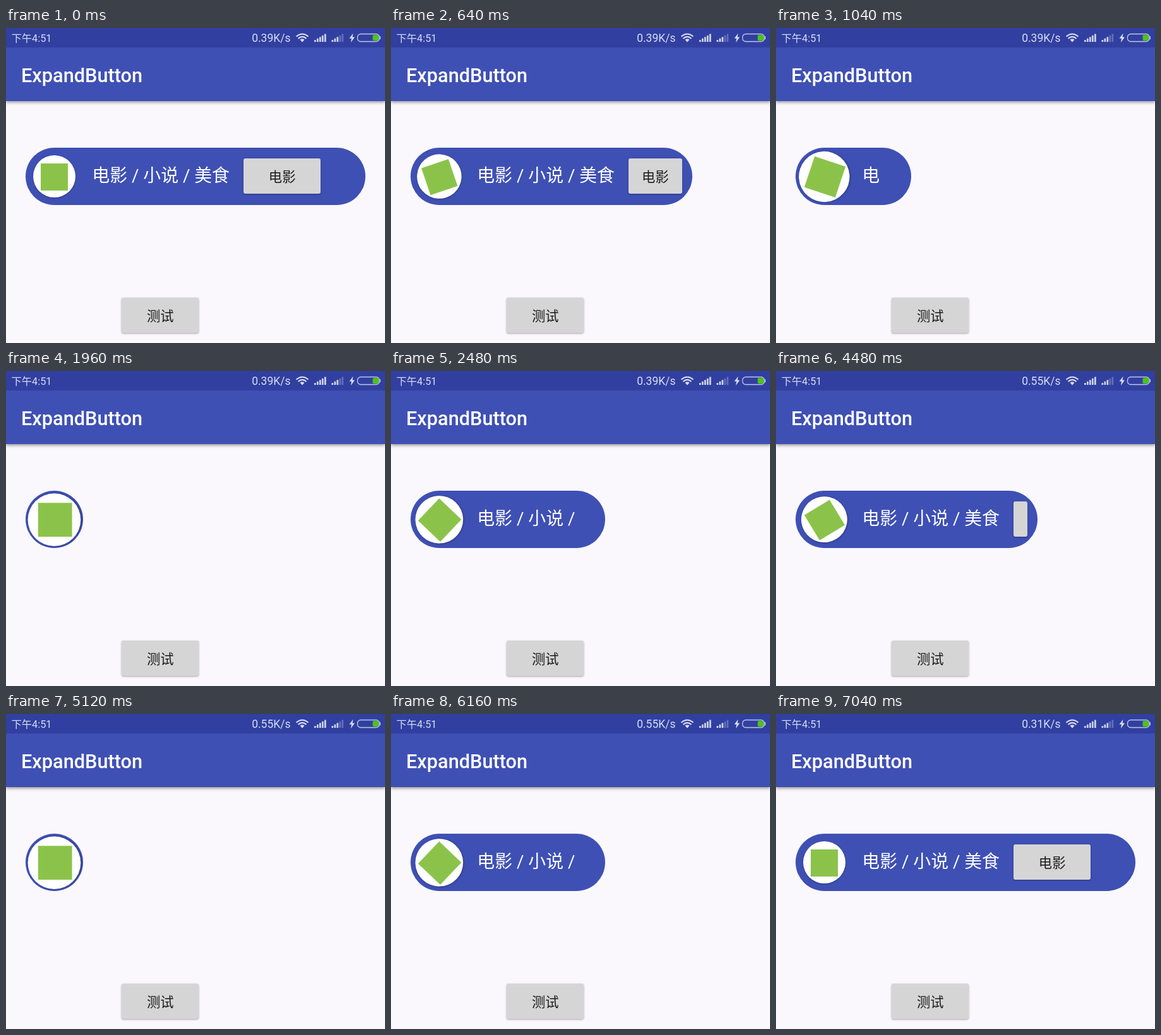
An HTML page that plays this animation: 600 px wide and 500 px high, repeating every 7080 ms.

```html
<!DOCTYPE html>
<html lang="zh-CN">
<head>
<meta charset="utf-8">
<title>ExpandButton</title>
<style>
  html, body { margin: 0; width: 100%; height: 100%; overflow: hidden; }
  body { font-family: Roboto, "Noto Sans CJK SC", "Noto Sans CJK", sans-serif; }
  #stage { position: relative; width: 600px; height: 500px; overflow: hidden; background: #faf8fc; }
  #stage div { position: absolute; }
  #stage .bar { left: 0; top: 0; width: 600px; height: 116px; background: #3f50b4; box-shadow: 0 2px 5px rgba(0, 0, 0, .42); }
  svg { position: absolute; left: 0; top: 0; }
  #pill { left: 30.5px; top: 189.5px; height: 91.5px; border-radius: 45.75px; background: #3f50b4; }
  #icon { left: 12.2px; top: 12px; width: 67.6px; height: 67.6px; border-radius: 50%; background: #fff; box-shadow: 0 1px 3px rgba(0, 0, 0, .3); }
  #icon div { left: 12.3px; top: 13px; width: 43px; height: 43px; background: #8bc34a; }
  #label { left: 105.8px; top: 25.8px; height: 40px; overflow: hidden; font-size: 27.85px; line-height: 40px; color: #fff; }
  #stage .button { display: flex; align-items: center; justify-content: center; width: 122px; height: 56px; border-radius: 3px; background: #d6d5d6; box-shadow: 0 1px 3px rgba(0, 0, 0, .35); }
  .button span { margin: 2px 12px 0; overflow: hidden; font-size: 21.35px; line-height: 25px; color: #1c1c1c; }
  #movie { left: 345.7px; top: 17.5px; }
  #test { left: 183.3px; top: 428px; }
</style>
</head>
<body>
<div id="stage">
  <div class="bar"></div>
  <svg width="600" height="116" fill="#d9dcf0">
    <rect width="600" height="31" fill="#3140a0"/>
    <text x="8.5" y="22" font-size="16.3">下午4:51</text>
    <text id="speed" x="450.5" y="22" font-size="17.5" text-anchor="end"></text>
    <g fill="none" stroke="#d9dcf0" stroke-width="2">
      <path d="M459.500 13.500Q469 5.500 478.500 13.500M462.500 16.800Q469 11 475.500 16.800"/>
      <rect x="556.500" y="9.500" width="34.500" height="12" rx="5" stroke-width="1.300" opacity=".85"/>
    </g>
    <path d="M465.500 18.500Q469 15.800 472.500 18.500L469 22.500Z"/>
    <g id="signals"></g>
    <path d="M549.500 8.500L543.500 16.500H547L546 23L552 14.500H548.500Z"/>
    <rect x="591.500" y="13" width="1.500" height="5" opacity=".85"/>
    <rect x="580.500" y="11" width="9.500" height="9" rx="2" fill="#4cc417"/>
    <text x="24" y="86" font-size="30.7" font-weight="500" fill="#fff">ExpandButton</text>
  </svg>
  <div id="pill">
    <div id="icon"><div></div></div>
    <div id="label">电影 / 小说 / 美食</div>
    <div id="movie" class="button"><span>电影</span></div>
  </div>
  <div id="test" class="button"><span>测试</span></div>
</div>
<script>
  const LOOP = 7080, STEP = 40, DURATION = 1000;
  const OPEN_WIDTH = 538.8, CLOSED_WIDTH = 91.5;
  const [pill, icon, label, movie, speed, signals] =
    ['pill', 'icon', 'label', 'movie', 'speed', 'signals'].map(id => document.getElementById(id));

  const bars = (x, lit) => [0, 1, 2, 3, 4].map(i =>
    `<rect x="${x + i * 4}" y="${19 - i * 2.4}" width="2.7" height="${3 + i * 2.4}" opacity="${i < lit ? .95 : .3}"/>`).join('');
  signals.innerHTML = bars(488, 5) + bars(515.5, 3);

  const clamp = (v, lo, hi) => Math.min(hi, Math.max(lo, v));
  const ease = ms => .5 - .5 * Math.cos(Math.PI * clamp(ms / DURATION, 0, 1));

  function draw(t) {
    const closed = ease(t - 339) - ease(t - 1990) + ease(t - 4079) - ease(t - 5670);
    const width = OPEN_WIDTH + (CLOSED_WIDTH - OPEN_WIDTH) * closed;
    const buttonWidth = clamp(width - 361.5, 0, 122);

    pill.style.width = width + 'px';
    icon.style.transform = `rotate(${-90 * closed}deg) scale(${1 + .25 * closed})`;
    label.style.width = Math.max(0, width - 131.8) + 'px';
    movie.style.width = buttonWidth + 'px';
    movie.style.visibility = buttonWidth > 0 ? 'visible' : 'hidden';
    speed.textContent = (t < 2500 ? '0.39' : t < 6520 ? '0.55' : '0.31') + 'K/s';
  }

  const start = performance.now();
  function tick() {
    const t = (performance.now() - start) % LOOP;
    draw(Math.floor(t / STEP) * STEP);
    requestAnimationFrame(tick);
  }
  tick();
</script>
</body>
</html>
```
